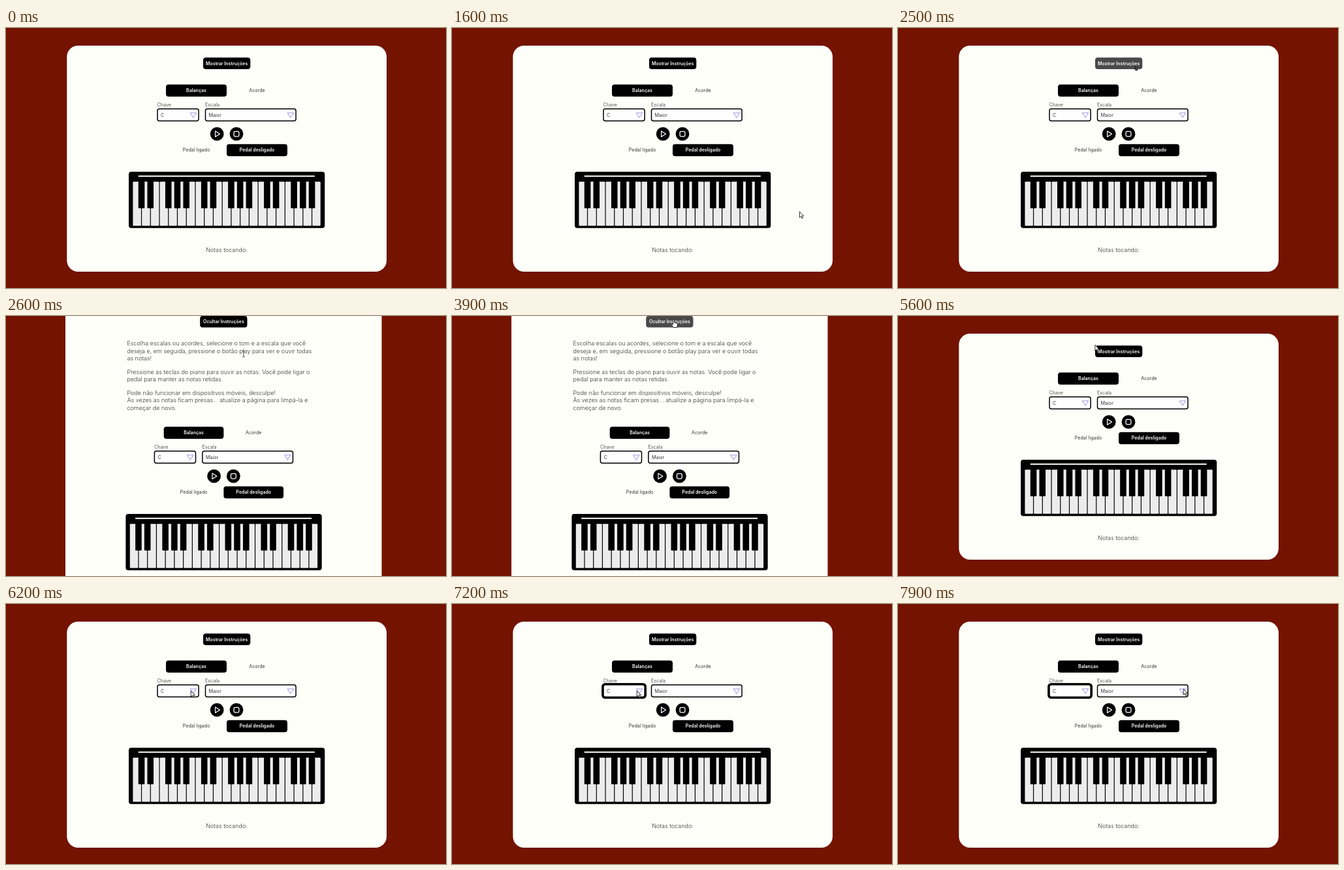
Recreate the animation shown at these times as an HTML page. Size 674 by 398 pixels, loop 8000 ms.

```html
<!DOCTYPE html>
<html lang="pt">
<head>
<meta charset="utf-8">
<title>Piano</title>
<style>
  html, body { margin: 0; width: 100%; height: 100%; overflow: hidden; background: #731300; }
  svg { display: block; width: 674px; height: 398px; font: 7.2px Inter, sans-serif; fill: #333; }
  .label { fill: #555; }
  .on { fill: #fff; font-size: 7px; font-weight: 600; }
  .mid { text-anchor: middle; }
  .body { font-size: 9px; font-weight: 300; fill: #333; }
  .line { fill: none; stroke-linejoin: round; }
</style>
</head>
<body>
<svg id="stage" viewBox="0 0 674 398"></svg>
<script>
const LOOP = 8000;
const CARD = '#fffffa', HOVER = '#494949';
const stage = document.getElementById('stage');

const rect = (x, y, w, h, r, fill, extra = '') =>
  `<rect x="${x}" y="${y}" width="${w}" height="${h}" rx="${r}" fill="${fill}" ${extra}/>`;
const text = (x, y, str, cls = '') => `<text x="${x}" y="${y}" class="${cls}">${str}</text>`;
const group = (id, content, extra = '') => `<g id="${id}" ${extra}>${content}</g>`;

function select(x, w, value) {
  const tx = x + w - 13.6;
  return rect(x + .7, 123.7, w - 1.4, 18.6, 3, '#fff', 'stroke="#000" stroke-width="1.5"') +
    text(x + 5.8, 135.5, value) +
    `<path class="line" d="M${tx} 129.9h9.4l-4.7 7.2z" stroke="#b8abea" stroke-width="1.2"/>`;
}

function keyboard() {
  const pitch = 13.74, left = 194;
  let keys = rect(188, 220, 300.3, 86.3, 4, '#000') + rect(202.5, 225.7, 270.5, 2, 1, '#fff');
  for (let i = 0; i < 21; i++)
    keys += rect(left + i * pitch + .4, 235.3, pitch - 1.2, 67.5, 1, '#ececec');
  for (let i = 0; i < 20; i++)
    if (![2, 6].includes(i % 7)) keys += rect(left + (i + 1) * pitch - 5, 235, 9.6, 41, 1, '#000');
  return keys;
}

// The two-option switches get slightly narrower when the page is scrollable.
function controls(name, tabWidth) {
  const left = 338 - tabWidth, first = 338 - tabWidth / 2, second = 338 + tabWidth / 2;
  return rect(left, 86.5, tabWidth, 18.4, 4, '#000', `id="${name}Tab"`) +
    text(first, 98.2, 'Balanças', 'on mid') + text(second, 98.2, 'Acorde', 'mid') +
    text(231.5, 120, 'Chave', 'label') + text(305, 120, 'Escala', 'label') +
    select(231.3, 64.5, 'C') + select(304.8, 140, 'Maior') +
    `<circle cx="323.2" cy="162.2" r="10.4" fill="#000"/><circle cx="353" cy="162.2" r="10.4" fill="#000"/>
     <path class="line" d="M320.6 157.8v8.8l6.9-4.4z" stroke="#fff" stroke-width="1.2"/>` +
    rect(349.1, 158.3, 7.8, 7.8, 1.8, 'none', 'stroke="#fff" stroke-width="1.3"') +
    text(first, 189.3, 'Pedal ligado', 'mid') +
    rect(338, 177.8, tabWidth, 18.4, 4, '#000') + text(second, 189.3, 'Pedal desligado', 'on mid') +
    keyboard() + text(338, 343, 'Notas tocando:', 'body mid');
}

const toggle = (name, label) =>
  rect(302, 45.2, 72.3, 17.8, 4, '#000', `id="${name}Toggle"`) + text(338.2, 56.7, label, 'on mid');

const instructions = [
  [45, 'Escolha escalas ou acordes, selecione o tom e a escala que você'],
  [56.6, 'deseja e, em seguida, pressione o botão play para ver e ouvir todas'],
  [68.2, 'as notas!'],
  [88.8, 'Pressione as teclas do piano para ouvir as notas. Você pode ligar o'],
  [100.3, 'pedal para manter as notas retidas.'],
  [121, 'Pode não funcionar em dispositivos móveis, desculpe!'],
  [132.3, 'Às vezes as notas ficam presas... atualize a página para limpá-la e'],
  [143.8, 'começar de novo.']
].map(([y, str]) => text(185.5, y, str, 'body')).join('');

const keyNames = ['C', 'C#', 'D', 'D#', 'E', 'F', 'F#', 'G', 'G#', 'A', 'A#', 'B'];
const dropdown = rect(231.3, 142.7, 64.5, 120, 0, '#fff', 'stroke="#777" stroke-width=".5"') +
  rect(231.6, 143, 63.9, 9.9, 0, '#1967d2') +
  keyNames.map((n, i) => `<text x="235" y="${150.6 + i * 9.95}" fill="${i ? '#333' : '#fff'}">${n}</text>`).join('');

const outline = 'stroke="#000" stroke-width=".8" stroke-linejoin="round"';
stage.innerHTML =
  rect(0, 0, 674, 398, 0, '#731300') +
  group('closed',
    rect(93.3, 27, 489.7, 346, 17, CARD) + toggle('closed', 'Mostrar Instruções') + controls('closed', 93) +
    group('focus', rect(230.6, 122.4, 65.9, 21.2, 4, 'none', 'stroke="#000" stroke-width="3"')) +
    group('dropdown', dropdown)) +
  group('open',
    rect(91, -20, 484.5, 440, 0, CARD) +
    group('openHead', toggle('open', 'Ocultar Instruções'), 'transform="translate(-4.8 -45.4)"') +
    instructions +
    group('openControls', controls('open', 91.7), 'transform="translate(-4.6 83)"')) +
  group('cursor',
    `<path id="arrow" d="M0 0v9l2.1-1.9 1.4 3.3 1.5-.7-1.4-3.1h2.7z" fill="#fff" ${outline}/>
     <path id="hand" d="M-1 1q1-1.6 2 0v4l4 1q1.3.5 1 2l-.8 4.5h-5.4l-3.6-4.6q.2-1.5 1.6-.6l1.2 1z" fill="#fff" ${outline}/>
     <path id="beam" class="line" d="M-1.8-4.5h1.3l.5.5.5-.5h1.3M0-4v8M-1.8 4.5h1.3l.5-.5.5.5h1.3" stroke="#222" stroke-width=".8"/>`);

const part = id => document.getElementById(id);
const show = (id, visible) => part(id).setAttribute('display', visible ? 'inline' : 'none');
const paint = (id, hovered) => part(id).setAttribute('fill', hovered ? HOVER : '#000');

// Each move: start, end, then the start, control and end points of a curve.
const moves = [
  [1400, 2300, [566, 330], [430, 130], [364, 58]],
  [3200, 3900, [364, 59], [355, 30], [339.5, 5]],
  [5200, 6100, [335.7, 4.3], [285, 40], [283.2, 133]],
  [7400, 7900, [283.2, 133], [360, 128], [437.2, 130]]
];

function cursorAt(t) {
  if (t >= 4800 && t < 5200) return moves[2][2];
  const [start, end, a, b, c] = moves.filter(m => t >= m[0]).pop() || moves[0];
  const p = Math.min(1, Math.max(0, (t - start) / (end - start)));
  const e = p * p * (3 - 2 * p);
  return a.map((v, i) => (1 - e) ** 2 * v + 2 * e * (1 - e) * b[i] + e * e * c[i]);
}

function render(t) {
  const [x, y] = cursorAt(t);
  const open = t >= 2600 && t < 4800;
  const onToggle = open ? y < 18 : t < 2600 && y < 63 && x < 374;
  const onTab = !open && t > 5200 && y > 86 && y < 105;
  const hand = onToggle || onTab;
  const beam = open && y > 37;

  show('open', open);
  show('closed', !open);
  show('focus', t >= 6300);
  show('dropdown', t >= 6300 && t < 7200);
  paint('closedToggle', !open && onToggle);
  paint('openToggle', open && onToggle);
  paint('closedTab', onTab);

  show('cursor', t >= 1500);
  show('hand', hand);
  show('beam', beam);
  show('arrow', !hand && !beam);
  part('hand').setAttribute('fill', open ? '#fff' : HOVER);
  part('hand').setAttribute('transform', open ? '' : 'scale(.55)');
  part('cursor').setAttribute('transform', `translate(${x} ${y})`);
}

function tick() {
  render(performance.now() % LOOP);
  requestAnimationFrame(tick);
}
tick();
</script>
</body>
</html>
```
